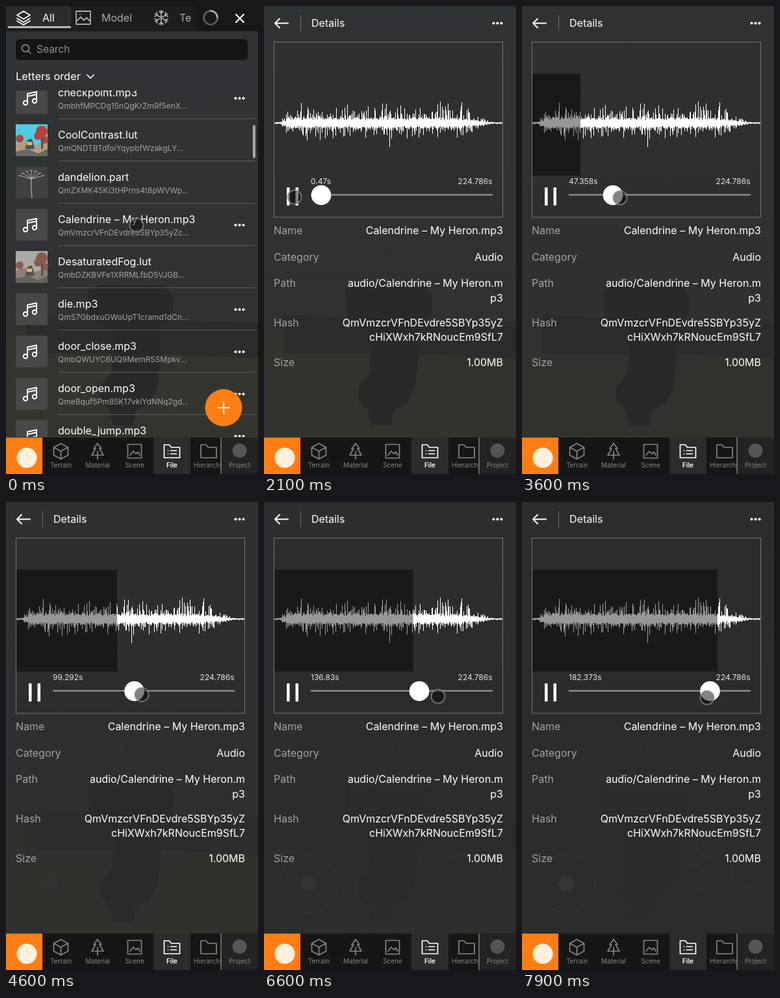
An HTML page for the animation above (8 s loop, 388 px wide and 720 px high).

```html
<!DOCTYPE html>
<html lang="en">
<head>
<meta charset="utf-8">
<title>Audio details</title>
<style>
html, body { margin: 0; width: 100%; height: 100%; overflow: hidden; background: #2c2d2d; }
svg { display: block; width: 388px; height: 720px; font-family: Inter, Roboto, sans-serif; }
text { white-space: pre; }
.line { fill: none; stroke-linecap: round; stroke-linejoin: round; }
</style>
</head>
<body>
<svg id="stage" viewBox="0 0 388 720" xmlns="http://www.w3.org/2000/svg"></svg>
<script>
const LOOP = 8000, STEP = 100, DURATION = 224.786;
const OPEN_AT = 300, PLAY_AT = 1630, GRAB_AT = 2700, DROP_AT = 5416, REGRAB_AT = 6600;
const TRACK = "Calendrine – My Heron";
const HASH = "QmVmzcrVFnDEvdre5SBYp35yZ";

const rect = (x, y, w, h, fill, extra = "") =>
  `<rect x="${x}" y="${y}" width="${w}" height="${h}" fill="${fill}" ${extra}/>`;
const circle = (x, y, r, fill, extra = "") =>
  `<circle cx="${x}" cy="${y}" r="${r}" fill="${fill}" ${extra}/>`;
const path = (d, fill, extra = "") => `<path d="${d}" fill="${fill}" ${extra}/>`;
const line = (d, color, width = 1.8) =>
  `<path class="line" d="${d}" stroke="${color}" stroke-width="${width}"/>`;
const text = (x, y, size, fill, value, extra = "") =>
  `<text x="${x}" y="${y}" font-size="${size}" fill="${fill}" ${extra}>${value}</text>`;
const at = (x, y, body) => `<g transform="translate(${x} ${y})">${body}</g>`;
const dots = (x, y) => [-6, 0, 6].map(d => circle(x + d, y, 2.1, "#fff")).join("");

// Icons, centred on 0,0
const icon = {
  layers: "M-10-4 0-10 10-4 0 2ZM-10 1 0 7 10 1M-10 5 0 11 10 5",
  picture: "M-11-10H11V10H-11ZM-11 6-4-1 1 4 5 0 11 6M-5-5h.1",
  snow: "M0-11V11M-9.5-5.5 9.5 5.5M-9.5 5.5 9.5-5.5M-3-10 0-7 3-10M-3 10 0 7 3 10M-10-2-6-3.5-7-8M10 2 6 3.5 7 8M-10 2-6 3.5-7 8M10-2 6-3.5 7-8",
  cube: "M0-12 11-6V6L0 12-11 6V-6ZM-11-6 0 0 11-6M0 0V12",
  tree: "M0-12 6-4H3L9 6H-9L-3-4H-6ZM0 0V12",
  scene: "M-10.5-10.5H10.5V10.5H-10.5ZM-7 6-2 0 2 4 5 1 8 6",
  folder: "M-12 10V-10H-4L-1-6H12V10Z",
  rows: "M-6-1h.1M-2-1H7M-6 4h.1M-2 4H7",
  note: "M-5 7V-7L9-10V4M-5-3 9-6"
};

function thumbnail(kind) {
  if (kind === "note") {
    const head = (x, y) => circle(x, y, 3.2, "none", 'stroke="#fff" stroke-width="2"');
    return rect(0, 0, 49, 49, "#484848", 'rx="3"') +
      at(23, 25, line(icon.note, "#fff", 2) + head(-8, 7) + head(6, 4));
  }
  if (kind === "seed") {
    const rays = [-18, -13, -7, 0, 7, 13, 18].map(x => {
      const y = 6 + x * x / 40;
      return `M24 19 ${24 + x} ${y}M${22 + x} ${y}h4`;
    }).join("");
    return rect(0, 0, 49, 49, "#414141", 'rx="3"') + line("M24 19Q23 34 25 48", "#aaa", 1.3) + line(rays, "#bbb", 0.9);
  }
  const [sky, leaf, ground, dark] = kind === "cool"
    ? ["#50cbe2", "#b84238", "#b99b80", "#46555c"]
    : ["#aaa9a5", "#885a4e", "#8c8075", "#555452"];
  return rect(0, 0, 49, 49, sky) + path("M0 30 14 26 30 32 49 27V49H0Z", ground) +
    circle(40, 11, 9, leaf) + circle(34, 18, 6, leaf) + circle(6, 22, 6, leaf) + circle(44, 24, 6, leaf) +
    rect(39, 20, 3, 18, dark) + path("M14 38 18 24 25 22 29 38Z", dark) +
    rect(17, 27, 8, 5, "#d9b65c") + path("M0 42 20 38 34 45 49 38V49H0Z", dark, 'opacity=".7"');
}

const files = [
  ["checkpoint.mp3", "QmbhfMPCDg15nQgKrZm9f5enX", "note"],
  ["CoolContrast.lut", "QmQNDTBTdfoiYqypbfWzakgLY", "cool"],
  ["dandelion.part", "QmZXMK45Ki3tHPrns4t8pWVWp", "seed"],
  [TRACK + ".mp3", HASH + "c", "note"],
  ["DesaturatedFog.lut", "QmbDZKBVFe1XRRMLfbD5VJGB", "fog"],
  ["die.mp3", "QmS7GbdxuGWoUpT1cramd1dCn", "note"],
  ["door_close.mp3", "QmbQWUYC6UQ9MemR5SMpkv", "note"],
  ["door_open.mp3", "QmeBquf5Pm85K17vkiYdNNq2gd", "note"],
  ["double_jump.mp3", "QmT4xWcP8sLr2VbNk7YhZq", "note"]
];

function fileRow([name, hash, kind], i) {
  const y = 133 + 65 * i;
  return at(15, y - 16, thumbnail(kind)) +
    text(80, y + 5.5, 16, "#fff", name) +
    text(80, y + 24.5, 12, "#a3a3a3", hash + "...") +
    (kind === "note" ? dots(359.5, y + 9) : "") +
    rect(80, y + 40, 304, 1, "#5c5c5c");
}

function listScreen() {
  return rect(0, 0, 388, 39, "#1b1d1f") + rect(0, 0, 100, 35, "#292b2d") + rect(3, 31, 97, 3, "#b9b9b9") +
    at(27, 18, line(icon.layers, "#fff")) + text(56, 23.5, 16, "#fff", "All") +
    at(119, 18, line(icon.picture, "#aaa")) + text(147, 23.5, 16, "#aaa", "Model") +
    at(239, 18, line(icon.snow, "#aaa")) + text(267, 23.5, 16, "#aaa", "Te") +
    rect(294, 0, 94, 39, "#161819") +
    circle(315, 18, 10.5, "none", 'stroke="#606060" stroke-width="2.6"') +
    line("M315 7.5A10.5 10.5 0 0 1 325.5 18", "#aaa", 2.6) +
    line("M354 13 366 25M366 13 354 25", "#fff", 2.2) +
    rect(15, 51, 357, 32, "#141516", 'rx="5"') +
    circle(30, 65, 5.5, "none", 'stroke="#999" stroke-width="1.5"') + line("M34 69 38 73", "#999", 1.5) +
    text(47, 72, 15.5, "#909090", "Search") +
    text(15, 113.5, 16.4, "#fff", "Letters order") + line("M125 106 130 111 135 106", "#fff", 1.7) +
    `<g clip-path="url(#listClip)">${files.map(fileRow).join("")}</g>` +
    rect(380, 183, 4, 51, "#a9a9a9", 'rx="2"') +
    circle(335, 618, 28.5, "#fd7e14") + line("M326 618H344M335 609V627", "#fff", 2.2);
}

function wavePath() {
  let seed = 71;
  const random = () => (seed = seed * 16807 % 2147483647) / 2147483647;
  const peaks = { 57: [31, 12], 66: [13, 27], 86: [12, 26], 128: [28, 9], 182: [30, 12], 193: [17, 37], 271: [33, 15], 283: [30, 10], 304: [32, 8] };
  let d = "";
  for (let x = 16; x < 367; x++) {
    const rise = Math.min(1, Math.max(0.08, (x - 24) / 16));
    const fall = Math.min(1, Math.max(0.06, (352 - x) / 52));
    const envelope = rise * fall;
    const height = spike => 0.4 + envelope * (4 + 4 * random() + spike * random() ** 4);
    const [up, down] = peaks[x] || [height(23), height(19)];
    d += `M${x + 0.5} ${(180 - up).toFixed(1)}V${(180 + down).toFixed(1)}`;
  }
  return d;
}

function detailsScreen() {
  const label = (y, name) => text(15, y + 5.5, 16, "#a3a3a3", name);
  const value = (y, content) => text(368, y + 5.5, 16, "#fff", content, 'text-anchor="end"');
  const bar = x => rect(x, 279, 4.5, 28, "#fff", 'rx="1"');
  const wave = wavePath();
  return line("M37 26.5H17M24 19.5 17 26.5 24 33.5", "#fff", 2) + rect(56, 14, 1, 25, "#686868") +
    text(73, 31.5, 16, "#fff", "Details") + dots(359.5, 26.5) +
    rect(15.5, 55.5, 352, 269.5, "rgba(40,42,46,.25)", 'stroke="#777"') +
    rect(16, 104, 0, 157, "#191919", 'id="played"') +
    path(wave, "none", 'stroke="#fff"') +
    path(wave, "none", 'stroke="#979797" stroke-width="1.1" clip-path="url(#playedClip)"') +
    text(72, 273.5, 12, "#e4e4e4", "", 'id="elapsed"') +
    text(351.5, 273.5, 12, "#e4e4e4", DURATION + "s", 'text-anchor="end"') +
    rect(72, 289.5, 280, 2, "#a0a0a0") + circle(87.5, 291, 15.3, "#fff", 'id="knob"') +
    `<g id="play">${line("M35 279V307L57 293Z", "#fff", 2.8)}</g>` +
    `<g id="pause">${bar(35) + bar(48.5)}</g>` +
    label(345, "Name") + value(345, TRACK + ".mp3") +
    label(386, "Category") + value(386, "Audio") +
    label(426, "Path") + value(426, `audio/${TRACK}.m`) + value(449, "p3") +
    label(487, "Hash") + value(487, HASH) + value(509, "cHiXWxh7kRNoucEm9SfL7") +
    label(548, "Size") + value(548, "1.00MB");
}

function backdrop() {
  const ring = (x, y, r) => circle(x, y, r, "none", 'stroke="#3b3a39"');
  return rect(0, 0, 388, 720, "#2c2c2b") +
    `<g id="scenery">${rect(0, 0, 388, 720, "url(#haze)") +
      path("M30 474 130 480 388 486V542L250 536 30 534Z", "#2c2c2d") +
      path("M126 436 150 428 245 430 258 446 257 476 236 490 238 545 232 590 220 612 200 622 196 645 164 645 160 622 144 606 146 584 162 566 168 500 128 482Z", "#292928")}</g>` +
    `<g id="controls">${ring(68, 587, 45) + circle(68, 587, 12, "#3a3939") +
      ring(263, 580, 20) + ring(288, 528, 20) + ring(345, 570, 22)}</g>` +
    text(147, 385, 19, "#1f1f1f", "Comet314", 'id="tag" stroke="#454443" stroke-width=".6"');
}

function navBar() {
  const item = (x, name, shape, color = "#858585", extra = "") =>
    at(x, 685, line(shape, color, 1.7)) + text(x, 710, 10, color, name, `text-anchor="middle" ${extra}`);
  return rect(0, 664, 388, 56, "#161616") + rect(227, 664, 57, 56, "#2c2c2c") +
    item(84.5, "Terrain", icon.cube) + item(141, "Material", icon.tree) + item(198, "Scene", icon.scene) +
    item(255.5, "File", icon.folder + icon.rows, "#fff", 'font-weight="600"') +
    item(312, "Hierarchy", icon.folder) +
    rect(331, 664, 57, 56, "#232323") + rect(330.5, 664, 1, 56, "#b9ad90") +
    circle(359.5, 684, 11, "#555") + text(359.5, 710, 10, "#858585", "Project", 'text-anchor="middle"') +
    rect(0, 664, 56, 56, "#fd7e14") + circle(32, 695, 15.5, "#fff0dc");
}

const stage = document.getElementById("stage");
stage.innerHTML = `<defs>
  <linearGradient id="haze" x1="0" y1="0" x2="0" y2="1">
    <stop offset="0" stop-color="#303336"/><stop offset=".55" stop-color="#303233"/>
    <stop offset=".72" stop-color="#33342e"/><stop offset="1" stop-color="#34352f"/>
  </linearGradient>
  <clipPath id="listClip"><rect y="130" width="388" height="533"/></clipPath>
  <clipPath id="playedClip"><rect id="playedMask" x="16" y="104" height="157"/></clipPath>
</defs>` + backdrop() +
  `<g id="list">${listScreen()}</g><g id="details">${detailsScreen()}</g>` + navBar() +
  circle(0, 0, 10.5, "rgba(8,8,8,.5)", 'id="cursor" stroke="#888" stroke-opacity=".75" stroke-width="2"');

const $ = id => document.getElementById(id);
const set = (id, attrs) => { for (const key in attrs) $(id).setAttribute(key, attrs[key]); };
const show = (id, on) => set(id, { display: on ? "inline" : "none" });

// Keys are [time, ...values]; values are interpolated linearly.
function track(keys, t) {
  let i = 0;
  while (i < keys.length - 2 && t >= keys[i + 1][0]) i++;
  const a = keys[i], b = keys[i + 1];
  const p = Math.min(1, Math.max(0, (t - a[0]) / (b[0] - a[0])));
  return a.slice(1).map((v, k) => v + (b[k + 1] - v) * p);
}

const cursorKeys = [[0, 201, 337], [600, 196, 338], [1000, 196, 338], [1500, 47, 294], [2200, 47, 294], [2600, 88, 293],
  [3600, 151, 295], [5100, 238, 297], [6300, 239, 298], [6600, 268, 299], [7300, 292, 301], [7900, 285, 301]];
const firstDrag = [[GRAB_AT, 1.07], [3600, 47.358], [5300, 135.646]];
const secondDrag = [[REGRAB_AT, 136.83], [6800, 160], [7500, 185], [7900, 182.373]];

function elapsedAt(t) {
  if (t < PLAY_AT) return 0;
  if (t < GRAB_AT) return (t - PLAY_AT) / 1000;
  if (t < DROP_AT) return track(firstDrag, t)[0];
  if (t < REGRAB_AT) return 135.646 + (t - DROP_AT) / 1000;
  return track(secondDrag, t)[0];
}

function draw(t) {
  const elapsed = elapsedAt(t), done = elapsed / DURATION;
  const opened = t >= OPEN_AT, playing = t >= PLAY_AT;
  show("list", !opened);
  show("details", opened);
  show("play", !playing);
  show("pause", playing);
  set("played", { width: 351 * done });
  set("playedMask", { width: 351 * done });
  set("knob", { cx: 87.5 + 249 * done });
  $("elapsed").textContent = +elapsed.toFixed(3) + "s";
  const [cx, cy] = track(cursorKeys, t);
  set("cursor", { cx, cy });
  set("scenery", { opacity: track([[600, 1], [3600, 0.8], [5300, 0.45], [7900, 0.1]], t)[0] });
  set("controls", { opacity: track([[3000, 0], [7900, 0.8]], t)[0] });
  set("tag", { opacity: track([[1500, 0], [3600, 0.2], [7900, 0.8]], t)[0] });
}

const start = performance.now();
function frame() {
  const t = (performance.now() - start) % LOOP;
  draw(Math.floor(t / STEP) * STEP);
  requestAnimationFrame(frame);
}
frame();
</script>
</body>
</html>
```
